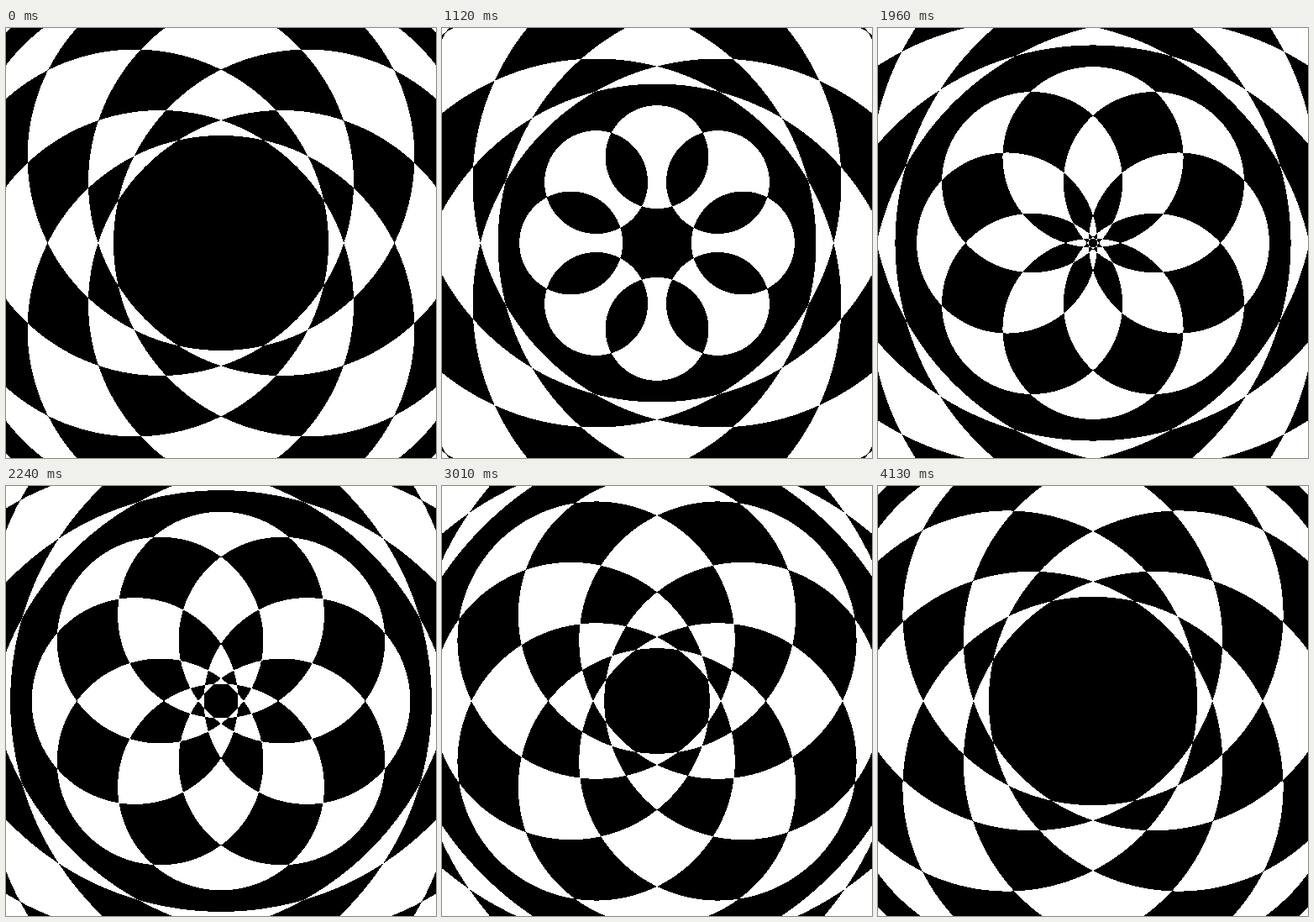
Recreate the animation shown at these times as an HTML page with a canvas. Size 512 by 512 pixels, loop 4.2 s.

```html
<!DOCTYPE html>
<html lang="en">
<head>
<meta charset="utf-8">
<title>Expanding rings</title>
<style>
html, body { margin: 0; width: 100%; height: 100%; overflow: hidden; background: #000; }
canvas { display: block; width: 512px; height: 512px; }
</style>
</head>
<body>
<canvas id="stage" width="512" height="512"></canvas>
<script>
const SIZE = 512, HALF = SIZE / 2;
const STEP = 70, STEPS = 60;
const SOURCES = 8;
const ORBIT = SIZE / 5;      // distance of each ring source from the middle
const SPACING = 230.4;       // gap between successive rings of one source
const BLACK = 0xff000000, WHITE = 0xffffffff;

const ctx = document.getElementById('stage').getContext('2d');
const image = ctx.createImageData(SIZE, SIZE);
const pixels = new Uint32Array(image.data.buffer);

// Distances to every source, in ring spacings, for one quadrant
const dist = new Float32Array(HALF * HALF * SOURCES);
for (let y = 0, i = 0; y < HALF; y++) {
  for (let x = 0; x < HALF; x++) {
    for (let s = 0; s < SOURCES; s++) {
      const a = s * 2 * Math.PI / SOURCES;
      dist[i++] = Math.hypot(x + 0.5 - ORBIT * Math.cos(a),
                             y + 0.5 - ORBIT * Math.sin(a)) / SPACING;
    }
  }
}

// Each ring edge crossed flips the colour; the quadrant is mirrored four ways
function draw(step) {
  const shift = 2 - step / STEPS;
  for (let y = 0, i = 0; y < HALF; y++) {
    const up = (HALF - 1 - y) * SIZE, down = (HALF + y) * SIZE;
    for (let x = 0; x < HALF; x++) {
      let crossed = 0;
      for (let s = 0; s < SOURCES; s++) crossed += (dist[i++] + shift) | 0;
      const left = HALF - 1 - x, right = HALF + x;
      pixels[up + left] = pixels[up + right] =
      pixels[down + left] = pixels[down + right] = crossed & 1 ? WHITE : BLACK;
    }
  }
  ctx.putImageData(image, 0, 0);
}

const start = performance.now();
let shown = -1;

function tick() {
  const step = Math.floor((performance.now() - start) / STEP) % STEPS;
  if (step !== shown) draw(shown = step);
  requestAnimationFrame(tick);
}
tick();
</script>
</body>
</html>
```
